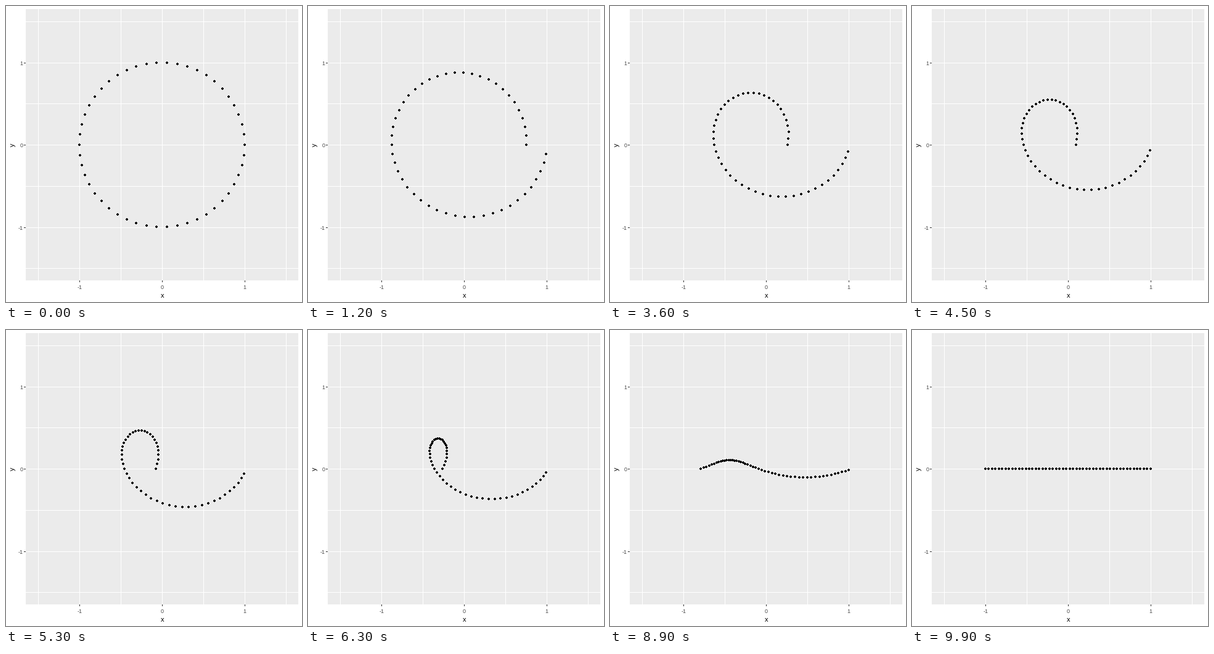
A matplotlib script for the animation above (10 s loop, 480 by 480 pixels).

```python
import numpy as np
import matplotlib.pyplot as plt
from matplotlib.animation import FuncAnimation
from matplotlib.collections import PolyCollection
from matplotlib.patches import Rectangle

SIZE = 480
FRAMES = 100
STATES = 20
POINTS = 50

# Panel box and data-to-pixel mapping
LEFT, TOP, RIGHT, BOTTOM = 32, 5, 474, 445
CX, SX = 253.38, 134.0
CY, SY = 225.61, 133.39

plt.rcParams["font.family"] = "Liberation Sans"
fig = plt.figure(figsize=(SIZE / 100, SIZE / 100), dpi=100, facecolor="white")
ax = fig.add_axes([0, 0, 1, 1])
ax.set_xlim(0, SIZE)
ax.set_ylim(SIZE, 0)
ax.axis("off")


def px(x):
    return np.floor(CX + SX * np.asarray(x))


def py(y):
    return np.floor(CY - SY * np.asarray(y))


def box(x, y, w, h, color):
    ax.add_patch(Rectangle((x, y), w, h, facecolor=color, linewidth=0))


def label(x, y, text, size, color, **kw):
    ax.text(x, y, text, fontsize=size * 0.72, color=color, va="baseline", **kw)


box(LEFT, TOP, RIGHT - LEFT, BOTTOM - TOP, "#EBEBEB")
for v in np.arange(-1.5, 1.6, 0.5):
    box(px(v), TOP, 1, BOTTOM - TOP, "white")
    box(LEFT, py(v), RIGHT - LEFT, 1, "white")

for v in (-1, 0, 1):
    box(px(v), BOTTOM, 1, 3, "#333333")
    box(LEFT - 3, py(v), 3, 1, "#333333")
    label(px(v) + 0.2, 459, str(v), 9, "#4D4D4D", ha="center")
    label(27.3, py(v) + 4, str(v), 9, "#4D4D4D", ha="right")

label(CX, 473, "x", 11, "black", ha="center")
label(14, CY, "y", 11, "black", ha="center", rotation=90, rotation_mode="anchor")

# Circle that unrolls into a straight line
angle = 2 * np.pi * np.arange(POINTS) / POINTS
circle = np.column_stack([np.cos(angle), np.sin(angle)])
line = np.column_stack([np.linspace(-1, 1, POINTS), np.zeros(POINTS)])

# Round 4 px dot: a square without its corners
DOT = np.array([(-1, -2), (1, -2), (1, -1), (2, -1), (2, 1), (1, 1),
                (1, 2), (-1, 2), (-1, 1), (-2, 1), (-2, -1), (-1, -1)])
dots = PolyCollection([DOT], facecolors="black", linewidths=0, zorder=3)
ax.add_collection(dots, autolim=False)

# Evenly spaced states, each snapped to a whole frame
state = np.linspace(0, 1, STATES)
key = np.round(state * (FRAMES - 1))


def update(i):
    t = np.interp(i, key, state)
    pos = (1 - t) * circle + t * line
    centers = np.column_stack([px(pos[:, 0]), py(pos[:, 1] + 1e-9)])
    dots.set_verts(centers[:, None, :] + DOT)
    return (dots,)


anim = FuncAnimation(fig, update, frames=FRAMES, interval=100,
                     repeat=True, repeat_delay=0, blit=False)
plt.show()
```
